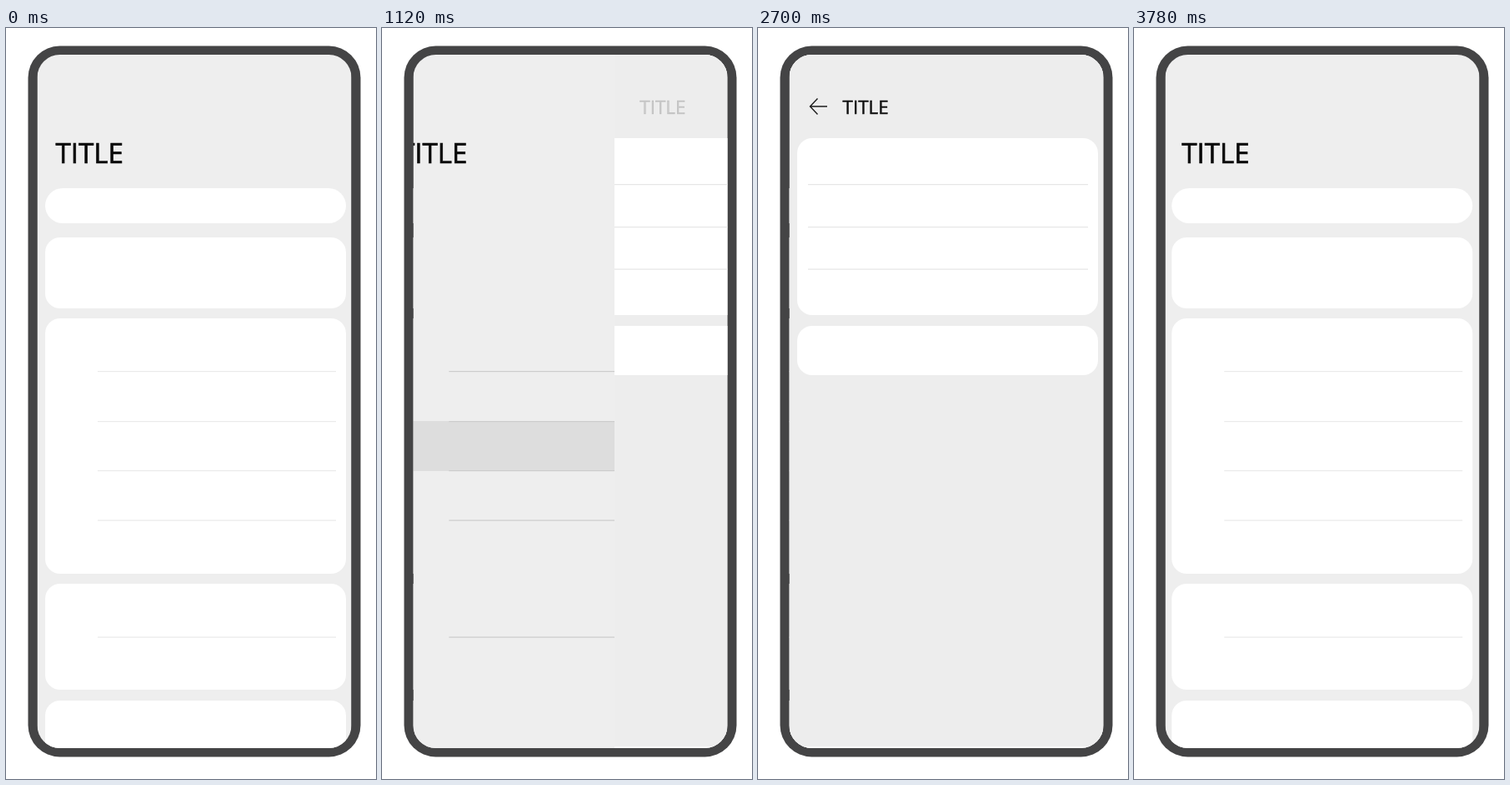
An HTML page with a canvas that plays this animation: 444 px wide and 900 px high, repeating every 3800 ms.

```html
<!DOCTYPE html>
<html lang="en">
<head>
<meta charset="utf-8">
<title>Page transition</title>
<style>
  html, body { margin: 0; width: 100%; height: 100%; overflow: hidden; background: #fff; }
  canvas { display: block; }
</style>
</head>
<body>
<canvas id="stage" width="444" height="900"></canvas>
<script>
const ctx = document.getElementById('stage').getContext('2d');
const LOOP = 3800;
const SCREEN = { x: 37.5, y: 32, w: 377, h: 831 };
const PUSH = { start: 1042, length: 374 };
const POP = { start: 3417, length: 450 };

const clamp = v => Math.max(0, Math.min(1, v));
const ramp = (t, from, to) => clamp((t - from) / (to - from));
const gray = v => `rgb(${v},${v},${v})`;
const mix = (a, b, k) => gray(Math.round(a + (b - a) * k));

// cubic-bezier(.2, 0, .2, 1), solved for x by bisection
function ease(x) {
  let lo = 0, hi = 1;
  for (let i = 0; i < 24; i++) {
    const s = (lo + hi) / 2;
    if (.6 * s - .6 * s * s + s * s * s < x) lo = s; else hi = s;
  }
  return lo * lo * (3 - 2 * lo);
}

const phase = (t, { start, length }) => ease(ramp(t, start, start + length));

function roundRect(x, y, w, h, r, fill) {
  ctx.beginPath();
  ctx.roundRect(x, y, w, h, r);
  ctx.fillStyle = fill;
  ctx.fill();
}

function rect(x, y, w, h, fill) {
  ctx.fillStyle = fill;
  ctx.fillRect(x, y, w, h);
}

// the thin outline gives the regular face a medium weight
function title(x, y, size, fill) {
  ctx.font = `${size}px "Open Sans", sans-serif`;
  ctx.fillStyle = ctx.strokeStyle = fill;
  ctx.lineWidth = size * .02;
  ctx.fillText('TITLE', x, y);
  ctx.strokeText('TITLE', x, y);
}

function drawList(t, shown) {
  const dim = ramp(shown, .03, .3);
  const backDim = dim * ramp(t, 1120, 1200);
  const shift = -82.5 * shown;
  const card = mix(255, 238, dim);
  const line = mix(234, 204, dim);

  rect(SCREEN.x, SCREEN.y, SCREEN.w, SCREEN.h, mix(238, 221, backDim));
  title(59.5 - 107 * shown, 162, 33.1, '#0a0a0a');
  for (const [y, h, r] of [[192, 42, 21], [251, 85, 18], [348, 306, 18], [666, 127, 18], [806, 90, 18]])
    roundRect(47 + shift, y, 361, h, r, card);

  const press = t < 2000 ? ramp(t, 900, 1000) : 0;
  if (press) rect(47 + shift, 471, 361, 60, `rgba(0,0,0,${.07 * press})`);
  for (const y of [411, 471, 530, 589.5, 729.5])
    rect(110 + shift, y, 286, 1.2, line);
}

function drawDetail(t, shown) {
  const edge = SCREEN.w * (1 - shown);
  const settle = clamp(edge / 5);
  const slide = extra => edge * .83 + extra * settle;
  const popping = t > POP.start;

  ctx.save();
  ctx.beginPath();
  ctx.rect(Math.round(SCREEN.x + edge), SCREEN.y, SCREEN.w, SCREEN.h);
  ctx.clip();
  rect(SCREEN.x, SCREEN.y, SCREEN.w, SCREEN.h, '#fafafa');
  rect(SCREEN.x, SCREEN.y, SCREEN.w, SCREEN.h - 2, '#ededed');

  const x = slide(4);
  roundRect(47 + x, 132, 361, 212, 18, '#fff');
  roundRect(47 + x, 357, 361, 59, 18, '#fff');
  for (const y of [187, 238, 288.5]) rect(60 + x, y, 336, 1.2, '#e6e6e6');

  const titleAlpha = popping ? 1 - ramp(t, 3416, 3804) : ramp(t, 1090, 1300);
  ctx.globalAlpha = titleAlpha;
  title(101.5 + slide(7.5), 103, 22.4, '#101010');

  ctx.globalAlpha = popping ? 1 - ramp(t, 3416, 3520) : ramp(t, 1160, 1320);
  ctx.translate(slide(11), 0);
  ctx.beginPath();
  ctx.moveTo(71.5, 84.5);
  ctx.lineTo(62.5, 94);
  ctx.lineTo(71.5, 103.5);
  ctx.moveTo(62.5, 94);
  ctx.lineTo(83, 94);
  ctx.strokeStyle = '#1c1c1c';
  ctx.lineWidth = 1.4;
  ctx.stroke();
  ctx.restore();
}

function draw(t) {
  const shown = phase(t, PUSH) - phase(t, POP);
  ctx.clearRect(0, 0, 444, 900);
  roundRect(26.5, 21.5, 399, 852, 38, '#444445');
  ctx.save();
  ctx.beginPath();
  ctx.roundRect(SCREEN.x, SCREEN.y, SCREEN.w, SCREEN.h, 27);
  ctx.clip();
  drawList(t, shown);
  if (shown > .04) drawDetail(t, shown);
  ctx.restore();
}

function tick() {
  draw(performance.now() % LOOP);
  requestAnimationFrame(tick);
}
tick();
</script>
</body>
</html>
```
